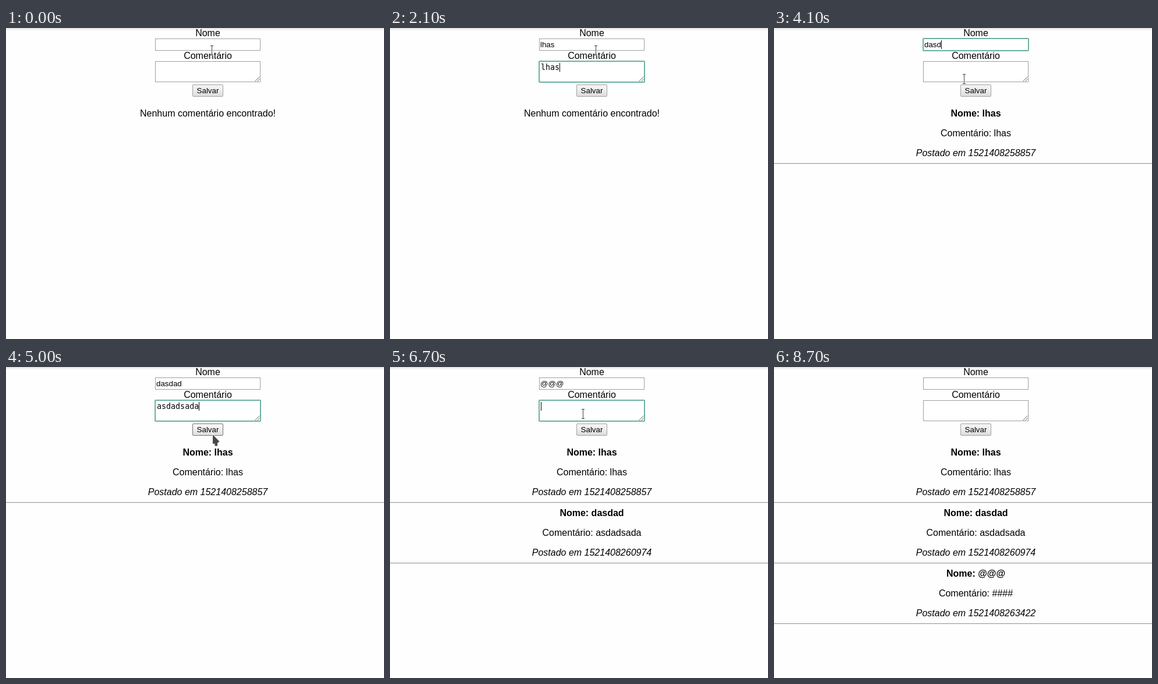
An HTML page for the animation above (8.8 s loop, 649 by 534 pixels).

```html
<!DOCTYPE html>
<html lang="pt">
<head>
<meta charset="utf-8">
<title>Comentários</title>
<style>
html, body { margin: 0; width: 100%; height: 100%; overflow: hidden; background: #fefefe; }
#page {
  position: absolute; left: 0; top: 0; width: 649px; height: 534px; overflow: clip;
  background: linear-gradient(#dadada, #f0f0f0 2px, #fefefe 5px);
  font: 16px/17px "Liberation Sans", Arial, sans-serif; color: #000; text-align: center;
}
#page > * { position: absolute; box-sizing: border-box; white-space: pre; }
/* Centred 22px right of the middle */
.line, .post { left: 44px; width: 605px; }
.field {
  left: 256px; width: 181px; border: 1px solid #a0a0a0; background: #fff;
  font-size: 13.333px; line-height: 15px; text-align: left;
}
.focus { border-color: #5fa899; box-shadow: 0 0 0 1px #78b8ab; border-radius: 1px; }
.focus::after {
  content: ""; display: inline-block; width: 1px; height: 15px;
  margin-right: -1px; vertical-align: top; background: #000;
}
#name { top: 18px; height: 21px; padding: 2px 1px; }
#text { top: 57px; height: 36px; padding: 2px; font-family: "DejaVu Sans Mono", monospace; }
#save {
  left: 320px; top: 97px; width: 53px; height: 21px; padding-top: 2px;
  border: 1px solid #a2a2a2; border-radius: 2px;
  background: linear-gradient(#f4f4f4, #efefef 40%, #dcdcdc);
  font-size: 13.333px; line-height: 15px;
}
#save.hover { border-color: #747474; background: linear-gradient(#f8f8f8, #f1f1f1 40%, #dedede); }
.post { height: 96px; }
.post > * { position: absolute; left: 0; width: 100%; }
.post i { top: 68px; }
.post span { top: 34px; }
.post u { left: -44px; top: 94px; width: 649px; height: 2px; background: linear-gradient(#9a9a9a 50%, #eee 50%); }
svg { left: 0; top: 0; width: 649px; height: 534px; fill: none; }
</style>
</head>
<body>
<div id="page">
  <div class="line" style="top:0">Nome</div>
  <div class="field" id="name"></div>
  <div class="line" style="top:39px">Comentário</div>
  <div class="field" id="text"></div>
  <div id="save">Salvar</div>
  <div class="line" id="none" style="top:138px">Nenhum comentário encontrado!</div>
  <svg>
    <path d="M427.5 91.5l8-8M431.5 91.5l4-4" stroke="#6a6a6a"/>
    <g id="beam">
      <path d="M-2-7.5H3M.5-7.5V8.5M-2 8.5H3" stroke="#fff" stroke-opacity=".7" stroke-width="3"/>
      <path d="M-2-7.5H3M.5-7.5V8.5M-2 8.5H3" stroke="#444"/>
    </g>
    <path id="arrow" d="M0 0V16L3.5 15.5V19.5H8V14.5L11.5 12Z" fill="#484848" stroke="#fff"
      stroke-opacity=".8" paint-order="stroke" stroke-width="2"/>
  </svg>
</div>
<script>
const LOOP = 8800;
const $ = id => document.getElementById(id);

// Each round: typing times of both fields, focus, blur and posting
const rounds = [
  { name: 'lhas', text: 'lhas', focus: 400, nameAt: [500, 1000], tab: 1200, textAt: [1300, 1900],
    blur: 2900, post: 3000, stamp: '1521408258857' },
  { name: 'dasdad', text: 'asdadsada', focus: 3600, nameAt: [3800, 4300], tab: 4500, textAt: [4600, 4900],
    blur: 5100, post: 5100, stamp: '1521408260974' },
  { name: '@@@', text: '####', focus: 5800, nameAt: [6000, 6300], tab: 6500, textAt: [6900, 7200],
    blur: 7600, post: 7600, stamp: '1521408263422' }
];

// Pointer path: time, x, y
const path = [
  [0, 353, 38], [2400, 353, 38], [2800, 340, 109], [3100, 340, 109], [3500, 330, 30], [3700, 330, 30],
  [4000, 326, 87], [4600, 326, 87], [5000, 355, 116], [5100, 353, 110], [5300, 353, 110],
  [5700, 335, 30], [5900, 335, 30], [6300, 331, 80], [7200, 331, 80], [7400, 342, 108],
  [7900, 342, 108], [8300, 53, 4], [LOOP, 53, 4]
];

rounds.forEach((r, i) => {
  r.el = document.createElement('div');
  r.el.className = 'post';
  r.el.style.top = 138 + 104 * i + 'px';
  r.el.innerHTML = `<b>Nome: ${r.name}</b><span>Comentário: ${r.text}</span>` +
    `<i>Postado em ${r.stamp}</i><u></u>`;
  $('page').insertBefore(r.el, document.querySelector('svg'));
});

function typed(s, [from, to], t) {
  if (t < from) return '';
  return s.slice(0, 1 + Math.floor((s.length - 1) * Math.min(1, (t - from) / (to - from)) + 1e-6));
}

function pointer(t) {
  const i = path.findIndex(p => p[0] > t);
  const [t0, x0, y0] = path[i - 1], [t1, x1, y1] = path[i];
  const k = (t - t0) / (t1 - t0);
  return [Math.round(x0 + (x1 - x0) * k), Math.round(y0 + (y1 - y0) * k)];
}

function draw(now) {
  const t = Math.floor(now % LOOP / 100) * 100;
  const r = rounds.find(r => t < r.post + 200);
  $('name').textContent = r ? typed(r.name, r.nameAt, t) : '';
  $('text').textContent = r ? typed(r.text, r.textAt, t) : '';
  const active = r && t >= r.focus && t < r.blur;
  $('name').classList.toggle('focus', !!active && t < r.tab);
  $('text').classList.toggle('focus', !!active && t >= r.tab);
  for (const q of rounds) q.el.style.display = t >= q.post ? '' : 'none';
  $('none').style.display = t < rounds[0].post ? '' : 'none';

  const [x, y] = pointer(t);
  const inForm = x >= 256 && x < 437 && y >= 18 && y < 94;
  const shown = t < 8300;
  for (const [id, on] of [['beam', inForm], ['arrow', !inForm]]) {
    $(id).setAttribute('transform', `translate(${x} ${y})`);
    $(id).style.display = on && shown ? '' : 'none';
  }
  $('save').classList.toggle('hover', shown && x >= 320 && x < 373 && y >= 97 && y < 118);
}

const start = performance.now();
(function frame() {
  draw(performance.now() - start);
  requestAnimationFrame(frame);
})();
</script>
</body>
</html>
```
